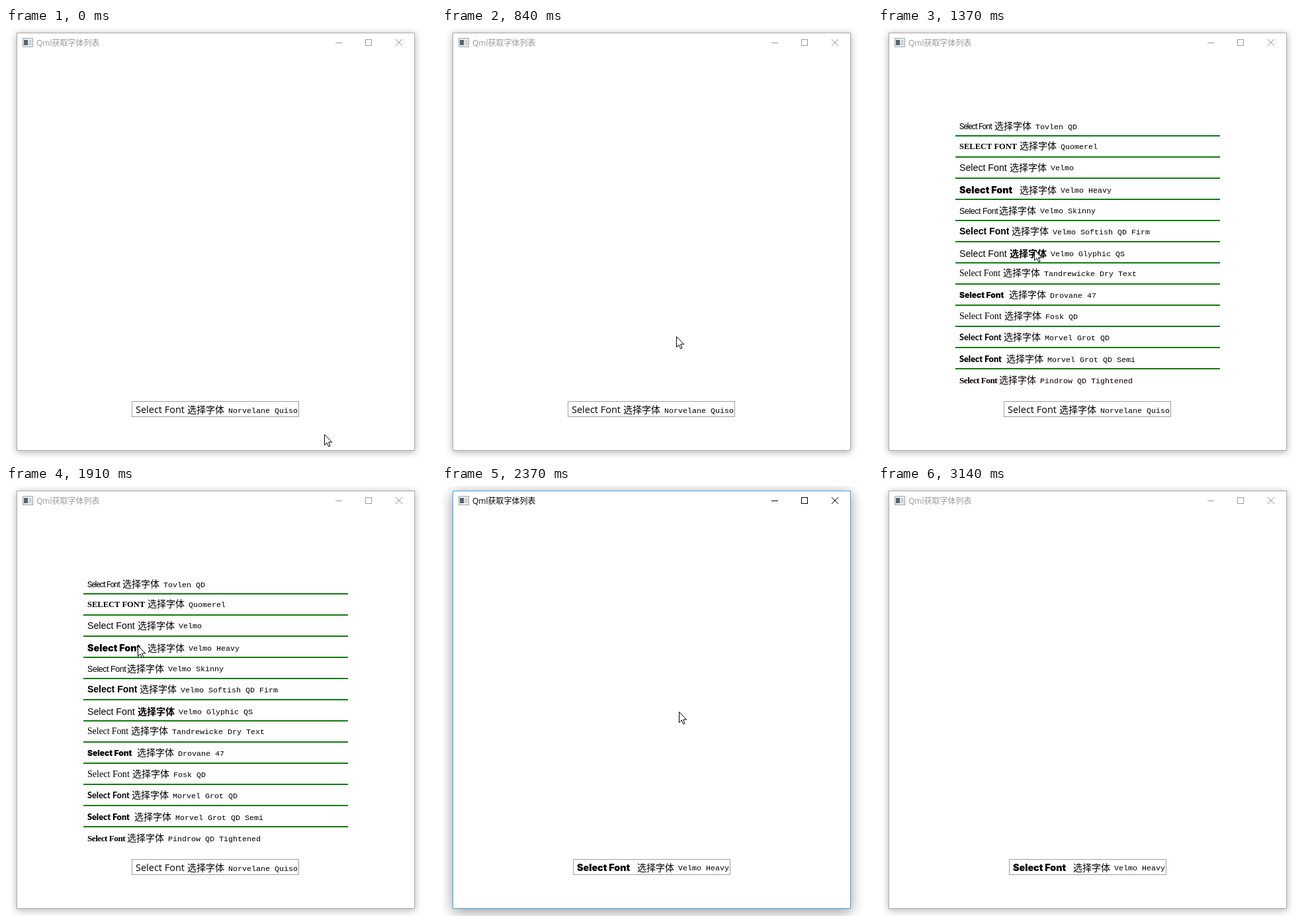
Recreate the animation shown at these times as an HTML page with a canvas. Size 650 by 650 pixels, loop 3220 ms.

```html
<!DOCTYPE html>
<html lang="zh">
<head>
<meta charset="utf-8">
<title>Qml获取字体列表</title>
<style>
html, body { margin: 0; width: 100%; height: 100%; overflow: hidden; background: #fff; }
canvas { display: block; }
</style>
</head>
<body>
<canvas id="stage" width="650" height="650"></canvas>
<script>
const ctx = document.getElementById('stage').getContext('2d');
const LOOP = 3220, STEP = 76.6;
const CJK = '"Noto Sans CJK SC", "Noto Sans CJK", sans-serif';
const SANS = '"Liberation Sans", sans-serif';
const SERIF = '"Liberation Serif", serif';
const MONO = '11.67px "Liberation Mono", monospace';

// name, sample font, x of the Chinese text, centre y, letter spacing
const rows = [
  ['Tovlen QD', '12px Roboto, sans-serif', 176, 148, -1],
  ['Quomerel', 'bold 12.5px ' + SERIF, 214, 178],
  ['Velmo', '14.2px ' + SANS, 199, 210.5],
  ['Velmo Heavy', '900 14.3px Inter, sans-serif', 214, 244.5],
  ['Velmo Skinny', '12.5px ' + SANS, 183, 275.5, -0.45],
  ['Velmo Softish QD Firm', 'bold 14px ' + SANS, 202, 307],
  ['Velmo Glyphic QS', '14.2px ' + SANS, 199, 340.5],
  ['Tandrewicke Dry Text', '13.7px ' + SERIF, 189, 370],
  ['Drovane 47', '900 12px Inter, sans-serif', 198, 403],
  ['Fosk QD', '14.1px ' + SERIF, 191, 435],
  ['Morvel Grot QD', 'bold 12.8px Lato, sans-serif', 190, 467],
  ['Morvel Grot QD Semi', '900 12.7px Lato, sans-serif', 194, 500],
  ['Pindrow QD Tightened', 'bold 13.2px ' + SERIF, 183, 532, -0.5]
];

// step, x, y of the pointer tip
const path = [
  [0, 481, 614], [5, 338, 575], [9, 338, 575], [11, 354, 466], [15, 347, 414],
  [18, 236, 335], [22, 199, 266], [25, 199, 241], [28, 199, 241],
  [31, 358, 341], [34, 517, 577], [37, 602, 638], [38, 625, 660], [42, 625, 660]
];

function text(str, x, y, font, color = '#000', spacing = 0) {
  ctx.letterSpacing = spacing + 'px';
  ctx.font = font;
  ctx.fillStyle = color;
  ctx.fillText(str, x, y);
}

function rect(x, y, w, h, color) {
  ctx.fillStyle = color;
  ctx.fillRect(x, y, w, h);
}

function frame(x, y, w, h, color) {
  ctx.strokeStyle = color;
  ctx.lineWidth = 1;
  ctx.strokeRect(x + 0.5, y + 0.5, w - 1, h - 1);
}

function fontLine([name, font, cjkX, midY, spacing], x) {
  const y = midY + 5;
  const sample = name === 'Quomerel' ? 'SELECT FONT' : 'Select Font';
  const weight = name === 'Velmo Glyphic QS' ? 'bold ' : '';
  text(sample, x, y, font, '#000', spacing);
  text('选择字体', cjkX, y, weight + '14px ' + CJK);
  text(name, cjkX + 62, y - 0.5, MONO);
}

function drawWindow(active) {
  const ink = active ? '#000' : '#999';
  ctx.save();
  ctx.shadowColor = active ? 'rgba(0,0,0,.42)' : 'rgba(0,0,0,.32)';
  ctx.shadowBlur = active ? 18 : 11;
  ctx.shadowOffsetY = active ? 4 : 2;
  rect(16, 7, 602, 632, '#fff');
  ctx.restore();
  frame(16, 7, 602, 632, active ? '#45a5e6' : '#aaa');

  rect(25, 15, 16, 14, '#eef0f2');
  frame(25, 15, 16, 14, '#a0a4a8');
  rect(27, 18, 6, 8, '#56636e');
  rect(34, 18, 5, 8, '#cfd4d8');
  text('Qml获取字体列表', 46, 27, '12px "Open Sans", ' + CJK, ink);

  rect(498, 22, 10, 1, ink);
  frame(543, 17, 10, 10, ink);
  ctx.beginPath();
  ctx.moveTo(589, 17); ctx.lineTo(599, 27);
  ctx.moveTo(599, 17); ctx.lineTo(589, 27);
  ctx.stroke();
}

function drawCombo(chosen) {
  if (chosen) {
    frame(198, 564, 238, 24, '#a0a0a0');
    fontLine(['Velmo Heavy', rows[3][1], 295, 576.5], 204);
  } else {
    frame(190, 564, 253, 24, '#a0a0a0');
    fontLine(['Norvelane Quiso', '14.5px "Open Sans", sans-serif', 274, 577], 196);
  }
}

function drawList() {
  rows.forEach((row, i) => {
    fontLine(row, 123);
    if (i) rect(117, 130 + 32 * i, 400, 2, '#0f7d0f');
  });
}

function drawPointer(step) {
  const i = path.findIndex(p => p[0] > step);
  const [s0, x0, y0] = path[i - 1], [s1, x1, y1] = path[i];
  const k = (step - s0) / (s1 - s0);
  ctx.save();
  ctx.translate(Math.round(x0 + (x1 - x0) * k) + 0.5, Math.round(y0 + (y1 - y0) * k) + 0.5);
  const arrow = new Path2D('M0 0V16L3.7 12.5L6.3 18.3L8.6 17.3L6.1 11.6H11.3Z');
  ctx.fillStyle = '#fff';
  ctx.fill(arrow);
  ctx.strokeStyle = '#000';
  ctx.lineWidth = 1;
  ctx.stroke(arrow);
  ctx.restore();
}

function draw(now) {
  const t = now % LOOP;
  // the screen refreshes on whole steps, aligned to 10 ms
  const step = Math.min(41, Math.floor((Math.floor(t / 10) * 10 + 9.99) / STEP));
  const chosen = step >= 28;
  rect(0, 0, 650, 650, '#fff');
  drawWindow(step === 9 || step === 10 || (chosen && step < 41));
  drawCombo(chosen);
  if (step >= 12 && !chosen) drawList();
  drawPointer(step);
}

const start = performance.now();
function tick() {
  draw(performance.now() - start);
  requestAnimationFrame(tick);
}
tick();
</script>
</body>
</html>
```
